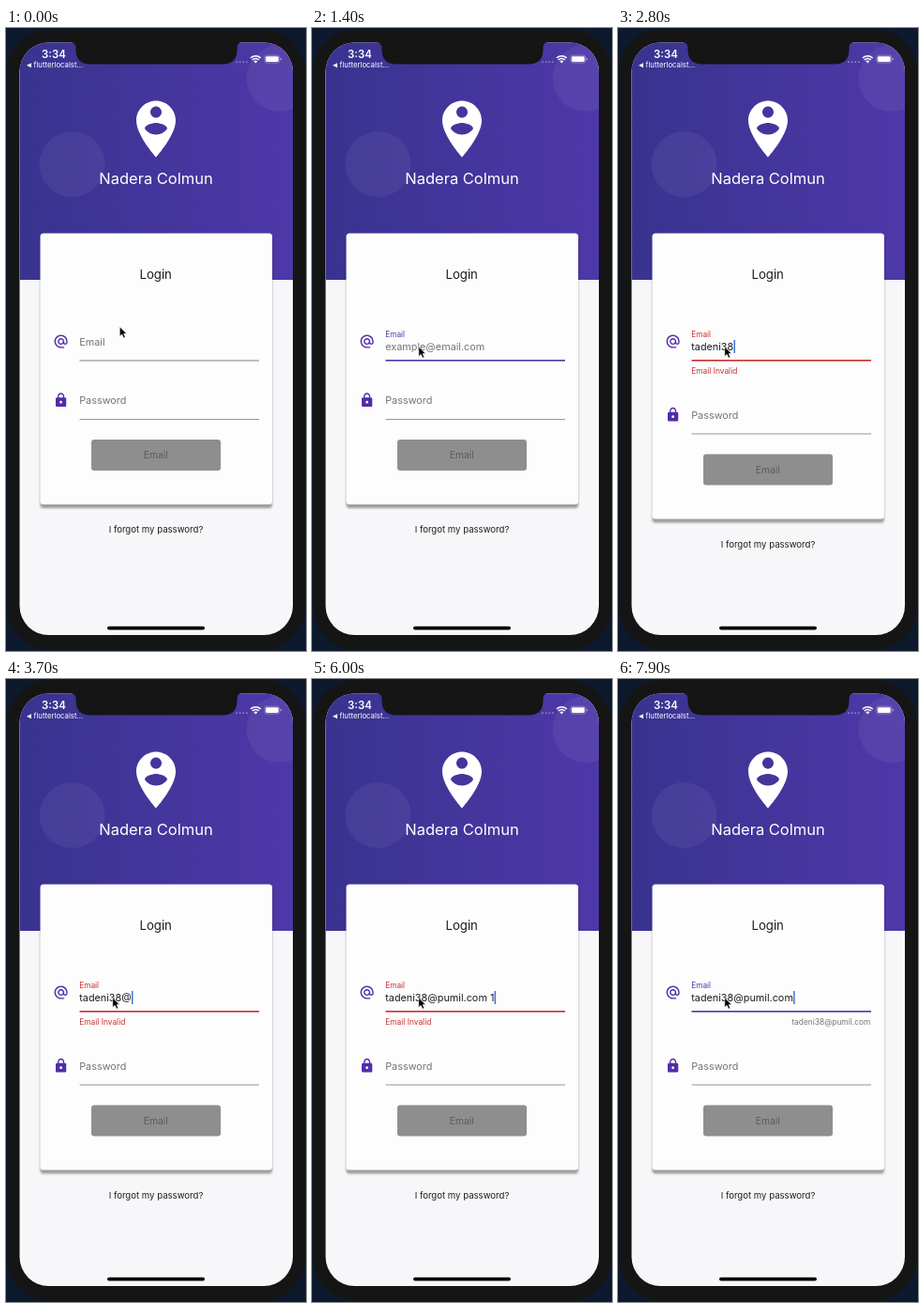
Write an HTML page that moves like this. It is 320x663 px and loops after 8000 ms.

```html
<!DOCTYPE html>
<html lang="en">
<head>
<meta charset="utf-8">
<title>Login form</title>
<style>
  html, body { margin: 0; width: 100%; height: 100%; overflow: hidden; background: #0d1a2e; }
  svg { display: block; width: 320px; height: 663px; }
  text { font-family: Inter, Roboto, sans-serif; white-space: pre; }
  .mid { text-anchor: middle; }
  .body { font-size: 10.85px; }
  .small { font-size: 8.4px; }
  .hint { fill: #747474; }
  .accent { fill: #512da8; }
</style>
</head>
<body>
<svg viewBox="0 0 320 663">
  <defs>
    <linearGradient id="purple">
      <stop offset="0" stop-color="#39338f"/>
      <stop offset="1" stop-color="#4e38a8"/>
    </linearGradient>
    <clipPath id="screen"><rect x="14.5" y="15.5" width="291.5" height="630.5" rx="31"/></clipPath>
    <filter id="soft" x="-10%" y="-10%" width="120%" height="120%"><feGaussianBlur stdDeviation="1.2"/></filter>
  </defs>

  <!-- phone -->
  <rect x="1" y="1" width="318" height="661" rx="46" fill="#151515"/>
  <g clip-path="url(#screen)">
    <rect width="320" height="663" fill="#f7f6f8"/>
    <rect x="14.5" y="15" width="291.5" height="253" fill="url(#purple)"/>
    <g fill="#fff" fill-opacity=".055">
      <circle cx="70.5" cy="145" r="35"/>
      <circle cx="292" cy="53.5" r="35.5"/>
    </g>
  </g>
  <path d="M69 15H251Q246.500 16 246.500 21V23Q246.500 38.500 231 38.500H90Q74.500 38.500 74.500 23V21Q74.500 16 69 15Z" fill="#151515"/>
  <rect x="108" y="636.700" width="104" height="3.800" rx="1.900" fill="#050505"/>

  <!-- status bar -->
  <g fill="#fff">
    <text x="38" y="32" font-size="11.400" font-weight="600">3:34</text>
    <path d="M22 39.800L27 37.300V42.300Z"/>
    <text x="29.500" y="42.400" font-size="7.800">flutterlocalst...</text>
    <g fill-opacity=".35">
      <circle cx="246" cy="36.300" r="1"/><circle cx="249.600" cy="36.300" r="1"/>
      <circle cx="253.200" cy="36.300" r="1"/><circle cx="256.800" cy="36.300" r="1"/>
    </g>
    <path d="M266.300 37.500L264.300 35.300Q266.300 33.700 268.300 35.300Z"/>
    <g fill="none" stroke="#fff" stroke-width="1.500">
      <path d="M262.700 33.900Q266.300 31 269.900 33.900"/>
      <path d="M260.900 31.800Q266.300 27.500 271.700 31.800"/>
    </g>
    <rect x="275.800" y="29.200" width="16" height="7.800" rx="2.300" fill="none" stroke="#fff" stroke-opacity=".45" stroke-width=".7"/>
    <rect x="276.900" y="30.200" width="13.800" height="5.800" rx="1.400"/>
    <path d="M292.700 31.700Q294 32 294 33.100T292.700 34.500Z" fill-opacity=".55"/>
  </g>

  <!-- header -->
  <path transform="translate(124 71.500) scale(3)" fill="#fff" d="M12 2C8.140 2 5 5.140 5 9c0 5.250 7 13 7 13s7-7.750 7-13c0-3.860-3.140-7-7-7zm0 2c1.100 0 2 .9 2 2s-.9 2-2 2-2-.9-2-2 .9-2 2-2zm0 10c-1.670 0-3.140-.85-4-2.150.020-1.320 2.670-2.050 4-2.050s3.980.730 4 2.050c-.86 1.300-2.330 2.150-4 2.150z"/>
  <text class="mid" x="160" y="166" font-size="16.500" fill="#fff">Nadera Colmun</text>

  <!-- card -->
  <rect class="card" x="36.500" y="222" width="247.500" height="289" rx="3.500" fill="#000" fill-opacity=".36" filter="url(#soft)"/>
  <rect class="card" x="36.500" y="218.500" width="247.500" height="288.500" rx="3.500" fill="#fdfdfe"/>
  <text class="mid" x="159.700" y="266.500" font-size="13.200" fill="#1c1c1c">Login</text>

  <path class="accent" transform="translate(50.200 325.100) scale(.703)" d="M12 2C6.480 2 2 6.480 2 12s4.480 10 10 10h5v-2h-5c-4.340 0-8-3.660-8-8s3.660-8 8-8 8 3.660 8 8v1.430c0 .79-.71 1.570-1.500 1.570s-1.500-.78-1.500-1.570V12c0-2.760-2.240-5-5-5s-5 2.240-5 5 2.240 5 5 5c1.380 0 2.640-.56 3.540-1.470.65.890 1.770 1.470 2.960 1.470 1.970 0 3.500-1.600 3.500-3.570V12c0-5.520-4.480-10-10-10zm0 13c-1.660 0-3-1.340-3-3s1.340-3 3-3 3 1.340 3 3-1.340 3-3 3z"/>
  <text id="label" x="78.200"></text>
  <text id="hint" class="body hint" x="78.200" y="343">example@email.com</text>
  <text id="value" class="body" x="78.200" y="343" fill="#1d1d1d"></text>
  <rect id="caret" y="332" width="1.500" height="14" fill="#3f73d8"/>
  <rect id="line" x="78.500" width="191.500"/>
  <text id="error" class="small" x="78.200" fill="#c92f2f">Email Invalid</text>
  <text id="counter" class="small" x="269.300" y="367.500" text-anchor="end" fill="#777"></text>

  <g id="lower">
    <path class="accent" transform="translate(50.200 387.600) scale(.703)" d="M18 8h-1V6c0-2.760-2.240-5-5-5S7 3.240 7 6v2H6c-1.100 0-2 .9-2 2v10c0 1.100.9 2 2 2h12c1.100 0 2-.9 2-2V10c0-1.100-.9-2-2-2zm-6 9c-1.100 0-2-.9-2-2s.9-2 2-2 2 .9 2 2-.9 2-2 2zm3.100-9H8.900V6c0-1.710 1.390-3.100 3.100-3.100 1.710 0 3.100 1.390 3.100 3.100v2z"/>
    <text class="body hint" x="78.200" y="400">Password</text>
    <rect x="78.500" y="416" width="191.500" height=".9" fill="#8a8a8a"/>
    <rect x="91" y="438" width="138" height="33" rx="3" fill="#8e8e8e"/>
    <text class="mid" x="159.800" y="458.200" font-size="10.300" fill="#5c5c5c">Email</text>
    <text class="mid" x="160" y="537" font-size="9.600" fill="#1f1f1f">I forgot my password?</text>
  </g>

  <path id="pointer" d="M0 0V10.200L2.400 8L4.100 11.800L5.900 11L4.300 7.300H7.400Z" fill="#000" stroke="#fff" stroke-width=".7" stroke-opacity=".8"/>
</svg>
<script>
const LOOP = 8000, FOCUS = 800, FIRST_KEY = 1500;
const ADDRESS = 'tadeni38@pumil.com';
// Times of each keystroke; the last two remove the extra " 1".
const typed = [1500, 1600, 1700, 1800, 1900, 2050, 2200, 2400, 3400,
               4300, 4400, 4500, 4600, 4700, 4850, 5000, 5200, 5400, 5800, 6000];
const erased = [7300, 7600];
const invalidSpans = [[FIRST_KEY, 5400], [5800, 7600]];
const GREY = [116, 116, 116], PURPLE = [81, 54, 166], RED = [201, 47, 47];

const el = id => document.getElementById(id);
const [label, hint, value, caret, line, error, counter, lower, pointer] =
  ['label', 'hint', 'value', 'caret', 'line', 'error', 'counter', 'lower', 'pointer'].map(el);
const cards = document.querySelectorAll('.card');
const cardHeights = [...cards].map(c => +c.getAttribute('height'));
const set = (node, attrs) => { for (const k in attrs) node.setAttribute(k, attrs[k]); };
const mix = (a, b, k) => a + (b - a) * k;
const rgb = (a, b, k) => `rgb(${a.map((v, i) => Math.round(mix(v, b[i], k)))})`;
const ease = (t, start, length) => {
  const k = Math.min(1, Math.max(0, (t - start) / length));
  return k * k * (3 - 2 * k);
};

label.textContent = 'Email';

function caretOpacity(t) {
  if (t < FOCUS) return 0;
  const last = Math.max(FOCUS, ...typed.concat(erased).filter(k => k <= t));
  const phase = (t - last) % 1000;
  return phase < 500 ? 1 - ease(phase, 420, 80) : ease(phase, 920, 80);
}

function render(t) {
  const passed = list => list.filter(k => k <= t).length;
  const text = (ADDRESS + ' 1').slice(0, passed(typed) - passed(erased));
  const focus = ease(t, FOCUS, 200);
  const invalid = invalidSpans.reduce((sum, [a, b]) => sum + ease(t, a, 170) - ease(t, b, 170), 0);
  const shift = t >= FIRST_KEY ? 15.5 : 0;
  const color = invalid > 0 ? rgb(PURPLE, RED, invalid) : rgb(GREY, PURPLE, focus);

  set(label, { y: mix(337.5, 329, focus), 'font-size': mix(10.85, 8.3, focus), fill: color });
  set(hint, { opacity: text ? 0 : focus });
  value.textContent = text;
  set(caret, { x: 78.4 + (text ? value.getComputedTextLength() : 0), opacity: caretOpacity(t) });
  set(line, { y: mix(353.5, 353, focus), height: mix(.9, 1.6, focus), fill: color });
  set(error, { y: mix(365, 367.5, invalid), opacity: invalid });
  counter.textContent = text === ADDRESS ? text : '';

  set(lower, { transform: `translate(0 ${shift})` });
  cards.forEach((card, i) => set(card, { height: cardHeights[i] + shift }));

  const move = ease(t, 150, 550);
  set(pointer, { transform: `translate(${mix(121.3, 113.8, move)} ${mix(318, 339.3, move)})` });
}

const begin = performance.now();
function tick() {
  render((performance.now() - begin) % LOOP);
  requestAnimationFrame(tick);
}
tick();
</script>
</body>
</html>
```
